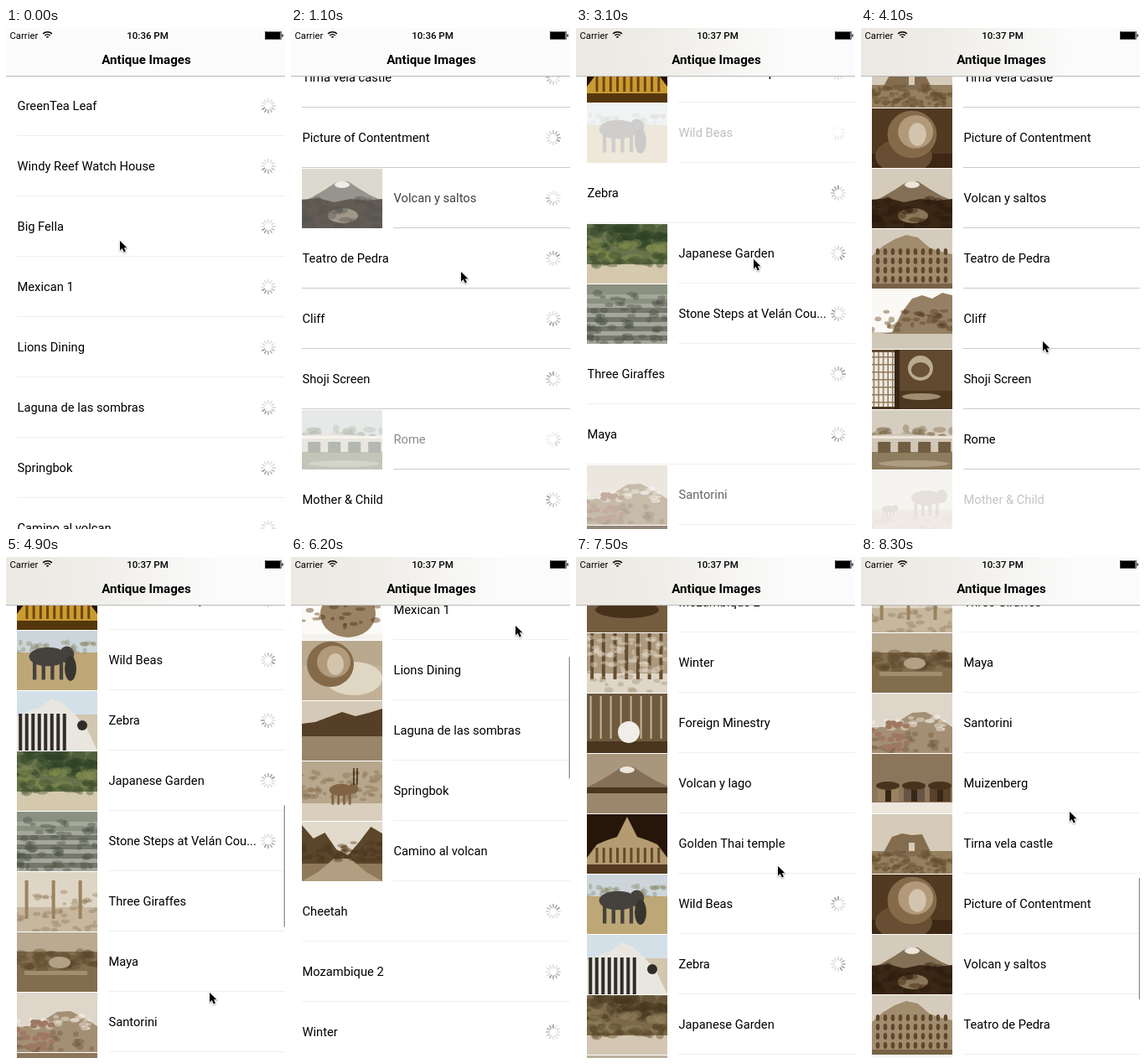
These frames come from a looping animation (333 by 598 pixels, 8400 ms). An HTML page with a canvas:

```html
<!DOCTYPE html>
<html lang="en">
<head>
<meta charset="utf-8">
<title>Photo list</title>
<style>
html, body { margin: 0; width: 100%; height: 100%; overflow: hidden; background: #fff; }
canvas { display: block; width: 333px; height: 598px; }
</style>
</head>
<body>
<canvas id="stage" width="333" height="598"></canvas>
<script>
const LOOP = 8400, W = 333, H = 598, NAV = 57, ROW = 72, PW = 96, PH = 71, FADE = 200;
const ctx = document.getElementById('stage').getContext('2d');
let pen = ctx, seed = 1;
const random = () => (seed = seed * 16807 % 2147483647) / 2147483647;

// Shapes
function rect(color, x, y, w, h) { pen.fillStyle = color; pen.fillRect(x, y, w, h); }
function blob(color, x, y, rx, ry = rx) {
  pen.fillStyle = color;
  pen.beginPath(); pen.ellipse(x, y, rx, ry, 0, 0, 7); pen.fill();
}
// A filled skyline with evenly spaced heights
function ridge(color, base, ...tops) {
  pen.fillStyle = color;
  pen.beginPath();
  pen.moveTo(0, base);
  tops.forEach((y, i) => pen.lineTo(i * PW / (tops.length - 1), y));
  pen.lineTo(PW, base);
  pen.fill();
}
function foliage(color, n, top, bottom, r = 4) {
  pen.globalAlpha = .4;
  while (n--) blob(color, random() * PW, top + random() * (bottom - top), r * (.5 + random()), r * (.4 + random() * .5));
  pen.globalAlpha = 1;
}
function columns(color, n, width, top, bottom, left = 0, right = PW) {
  for (let i = 0; i < n; i++) rect(color, left + (i + .3) * (right - left) / n, top, width, bottom - top);
}
function beast(color, x, y, k) {
  blob(color, x, y, 18 * k, 9 * k);
  blob(color, x + 18 * k, y - 2 * k, 7 * k, 8 * k);
  columns(color, 4, 3.5 * k, y, y + 22 * k, x - 17 * k, x + 17 * k);
}
function lion(x, y, k) {
  blob('#8d693f', x, y, 28 * k, 27 * k);
  blob('#bd9866', x + 4 * k, y - 3 * k, 20 * k, 19 * k);
  blob('#dcc49c', x + 6 * k, y, 10 * k, 13 * k);
}
function volcano() {
  ridge('#77736c', 46, 40, 33, 25, 16, 15, 24, 32, 38);
  blob('#eae6dd', 48, 19, 9, 4);
}

// name, sky, ground, horizon, subject
const photos = [
  ['GreenTea Leaf', '#55713c', '#3f5a2c', 45, () => blob('#a7c168', 48, 36, 30, 12)],
  ['Windy Reef Watch House', '#b7cbdc', '#77855c', 52, () => columns('#eee', 1, 10, 12, 54, 44)],
  ['Big Fella', '#cfd5d0', '#b59c6b', 40, () => beast('#75664f', 43, 32, 1.3)],
  ['Mexican 1', '#fcfaf5', '#f7f2e9', 64, () => { blob('#9c835f', 55, 40, 33, 28); foliage('#3d2a18', 22, 22, 55); }],
  ['Lions Dining', '#b8ab8b', '#c4b28b', 30, () => { blob('#e5d6b8', 62, 45, 34, 20); lion(34, 28, 1); }],
  ['Laguna de las sombras', '#d5cbb8', '#93886f', 40, () => ridge('#4d4132', 42, 27, 25, 19, 13, 18, 14, 9)],
  ['Springbok', '#b5aa87', '#ddd0b7', 50, () => { foliage('#7d724e', 60, 12, 46); beast('#8b6135', 47, 34, .8); columns('#362b1c', 2, 1.5, 8, 28, 60, 68); }],
  ['Camino al volcan', '#e0dbcd', '#8d7b5a', 44, () => { ridge('#544930', 50, 4, 20, 13, 33, 40, 24, 6, 14); ridge('#b5a07b', 71, 71, 60, 44, 44, 60, 71); foliage('#3d3722', 50, 25, 46); }],
  ['Cheetah', '#b8ad83', '#a08d56', 40, () => beast('#cba55e', 45, 37, 1)],
  ['Mozambique 2', '#8c7c62', '#6f5e43', 28, () => blob('#43321f', 48, 44, 38, 10)],
  ['Winter', '#a99c7e', '#dcd7c9', 48, () => { columns('#5d5038', 7, 4, 0, 55); foliage('#e6e0d1', 70, 5, 48); foliage('#9f9376', 15, 50, 71); }],
  ['Foreign Minestry', '#665d49', '#40372a', 57, () => { columns('#c3b99f', 8, 2, 3, 54); blob('#eee', 50, 46, 13); }],
  ['Volcan y lago', '#a39a86', '#918a79', 47, () => { volcano(); rect('#40372a', 0, 40, PW, 7); }],
  ['Golden Thai temple', '#211204', '#54370d', 58, () => { ridge('#c99c31', 60, 52, 36, 31, 27, 3, 27, 31, 36, 52); columns('#71430b', 10, 3, 40, 58, 8, 90); }],
  ['Wild Beas', '#ccd5da', '#bea776', 26, () => { foliage('#8d8968', 30, 14, 26); beast('#45423d', 37, 31, 1.25); blob('#383530', 64, 45, 7, 15); }],
  ['Zebra', '#d4e0e8', '#d1c6ae', 28, () => { ridge('#e9e6df', 71, 30, 24, 20, 9, 14, 27, 42, 71); columns('#302c28', 8, 4, 27, 71, 0, 60); blob('#302c28', 78, 41, 6); }],
  ['Japanese Garden', '#68734b', '#d4c9ad', 48, () => { foliage('#2d4025', 50, 0, 30, 8); foliage('#869150', 25, 22, 42, 7); foliage('#3d4d2b', 25, 36, 50, 6); }],
  ['Stone Steps at Velán Cou...', '#8b9180', '#74786c', 24, () => { for (let y = 12; y < PH; y += 11) rect('#a5a79c', 0, y, PW, 5); foliage('#484d40', 60, 10, 71, 5); }],
  ['Three Giraffes', '#dfd7bf', '#c9b995', 42, () => { columns('#a7824a', 3, 4, 10, 56); foliage('#8d805a', 40, 20, 71); }],
  ['Maya', '#b4ad93', '#79734f', 23, () => { foliage('#4f4c30', 45, 24, 45, 6); blob('#b1a47b', 51, 36, 13, 7); rect('#9c926a', 9, 46, 75, 5); }],
  ['Santorini', '#d9d8cf', '#a08c70', 40, () => { ridge('#a19079', 71, 43, 41, 33, 23, 22, 30, 40); foliage('#fffaf0', 25, 27, 43); foliage('#655d40', 25, 46, 71); for (let i = 0; i < 22; i++) blob('#c9616f', random() * 44, 35 + random() * 33, 4, 3); }],
  ['Muizenberg', '#85776b', '#eee7da', 58, () => ['#9b8550', '#55547a', '#4d4439'].forEach((c, i) => { rect(c, 7 + i * 31, 36, 25, 21); blob('#403329', 19 + i * 31, 38, 14, 5); rect('#2e2923', 16 + i * 31, 43, 7, 14); })],
  ['Tirna vela castle', '#d6cdb6', '#91825a', 44, () => { ridge('#807050', 50, 50, 49, 27, 23, 25, 24, 49, 50, 50); rect('#d6cdb6', 44, 34, 7, 10); foliage('#584b2c', 65, 45, 71); }],
  ['Picture of Contentment', '#4d3a26', '#38291b', 54, () => { blob('#665035', 38, 57, 34, 21); lion(48, 31, 1.05); }],
  ['Volcan y saltos', '#d2cdbf', '#464036', 37, () => { volcano(); ridge('#30291f', 71, 37, 35, 40, 36, 38, 36); blob('#837764', 49, 56, 18, 9); foliage('#211d16', 35, 36, 71, 6); }],
  ['Teatro de Pedra', '#d2cec3', '#716553', 61, () => { ridge('#a28d6b', 65, 32, 20, 12, 7, 10, 22, 27, 30); for (let y = 27; y < 62; y += 11) for (let x = 7; x < 90; x += 9) blob('#594832', x, y, 2.3, 4); }],
  ['Cliff', '#faf9f4', '#ccc9bc', 51, () => { ridge('#94816a', 53, 53, 53, 51, 27, 11, 7, 11, 4, 7); foliage('#493b29', 35, 25, 49); }],
  ['Shoji Screen', '#5b4b35', '#45382a', 49, () => { rect('#eee8da', 0, 3, 28, 65); columns('#8d7d61', 5, 1.5, 3, 68, 0, 28); for (let y = 8; y < 68; y += 9) rect('#8d7d61', 0, y, 28, 1.5); rect('#30261a', 27, 0, 6, PH); blob('#b9ac8e', 58, 22, 15); blob('#625538', 58, 24, 11, 9); blob('#9f8d70', 59, 56, 23, 4); }],
  ['Rome', '#cbd1ce', '#7f8268', 48, () => { foliage('#667057', 25, 22, 33, 6); ridge('#d0c9b8', 50, 30, 28, 30, 34); columns('#5c6454', 4, 15, 38, 51); rect('#eee7d8', 0, 31, PW, 3); blob('#a1a287', 50, 64, 42, 4); }],
  ['Mother & Child', '#dcd2ba', '#c2b086', 47, () => { beast('#8d7d68', 65, 33, 1); beast('#8d7d68', 20, 46, .45); foliage('#a18d63', 20, 55, 71); }]
];

// Each section loads as it scrolls into view; `delay` is the wait before a row turns brown
const sections = [
  { first: 0, at: 5000, delay: () => 200 },
  { first: 8, at: 6450, delay: () => 100 },
  { first: 13, at: 2575, delay: turn => 3000 + turn * 1500 },
  { first: 18, at: 2650, delay: () => 300 },
  { first: 22, at: 920, delay: (turn, n) => 350 + n * 350 }
];

const rows = photos.map((photo, i) => {
  const section = sections.filter(s => s.first <= i).pop();
  const n = i - section.first, turn = i % 4;
  const load = section.at + n * 15 + turn * 230;
  return { name: photo[0], load, brown: load + section.delay(turn, n), ...develop(photo, i) };
});

// Paints a photo once in colour and once in brown tones
function develop([, sky, ground, horizon, subject], i) {
  const make = () => Object.assign(document.createElement('canvas'), { width: PW, height: PH });
  const color = make(), sepia = make();
  pen = color.getContext('2d', { willReadFrequently: true });
  seed = 99 + i * 7;
  rect(sky, 0, 0, PW, PH);
  rect(ground, 0, horizon, PW, PH);
  subject();
  const image = pen.getImageData(0, 0, PW, PH), d = image.data;
  for (let p = 0; p < d.length; p += 4) {
    const light = (d[p] * .3 + d[p + 1] * .59 + d[p + 2] * .11) / 255;
    [.8, 1.05, 1.45].forEach((power, c) => { d[p + c] = d[p + c] * .2 + 204 * light ** power; });
  }
  sepia.getContext('2d').putImageData(image, 0, 0);
  pen = ctx;
  return { color, sepia };
}

// Resting places of list and pointer, each reached by a drag
const moves = [
  { from: 0, to: 0, scroll: 0, x: 136, y: 254 },
  { from: 100, to: 930, scroll: 1618, x: 203, y: 291 },
  { from: 2100, to: 2600, scroll: 976, x: 212, y: 276 },
  { from: 3200, to: 3700, scroll: 1618, x: 217, y: 374 },
  { from: 4600, to: 5300, scroll: 0, x: 283, y: 330 },
  { from: 5900, to: 6645, scroll: 687, x: 241, y: 369 },
  { from: 7560, to: 8260, scroll: 1335, x: 249, y: 304 }
];

function pose(t) {
  const n = Math.max(1, moves.filter(m => m.from <= t).length - 1);
  const a = moves[n - 1], b = moves[n];
  const k = Math.min(1, Math.max(0, (t - b.from) / (b.to - b.from)));
  const mix = key => a[key] + (b[key] - a[key]) * k * k * (3 - 2 * k);
  const drag = Math.sign(a.scroll - b.scroll) * 275 * Math.sin(Math.PI * k);
  return { scroll: Math.round(mix('scroll')), x: mix('x'), y: Math.min(520, Math.max(82, mix('y') + drag)) };
}

function text(str, x, y, size, weight = 400, align = 'left') {
  pen.font = `${weight} ${size}px Roboto, sans-serif`;
  pen.textAlign = align;
  pen.fillStyle = '#000';
  pen.fillText(str, x, y);
}

function spinner(x, y, t, offset) {
  const lead = Math.floor(t * .012 + 8 + offset);
  pen.lineWidth = 1.7;
  pen.lineCap = 'round';
  for (let i = 0; i < 12; i++) {
    const a = i * Math.PI / 6 - Math.PI / 2, age = (lead - i + 12) % 12;
    pen.strokeStyle = `rgba(90,90,90,${Math.max(.2, .62 - age * .07)})`;
    pen.beginPath();
    pen.moveTo(x + 5 * Math.cos(a), y + 5 * Math.sin(a));
    pen.lineTo(x + 8.3 * Math.cos(a), y + 8.3 * Math.sin(a));
    pen.stroke();
  }
}

function drawRow(row, i, y, t, line) {
  const loaded = t >= row.load, brown = t >= row.brown;
  pen.globalAlpha = loaded ? Math.min(1, (t - (brown ? row.brown : row.load)) / FADE) : 1;
  if (loaded) pen.drawImage(brown ? row.sepia : row.color, 13, y + 1);
  text(row.name, loaded ? 122.5 : 13.5, y + 41, 14.7);
  if (!brown) spinner(313, y + 36, t, t > 900 ? i * 5 : 0);
  pen.globalAlpha = 1;
  rect(line, loaded ? 122 : 13, y + 71, W, 1);
}

function drawNav(t, scroll) {
  rect('#fbfbfb', 0, 0, W, NAV);
  const under = rows[Math.floor((scroll - NAV / 2) / ROW)];
  if (under && t > under.load) {
    const tint = pen.createLinearGradient(0, 0, 250, 0);
    tint.addColorStop(0, '#ece8e2');
    tint.addColorStop(.4, '#efede8');
    tint.addColorStop(1, '#fbfbfb');
    rect(tint, 0, 0, W, NAV);
  }
  rect('#b9b9b9', 0, NAV, W, 1);
  text('Antique Images', 167.5, 43, 15.1, 600, 'center');
  text('Carrier', 4.5, 13, 11.3);
  text(t < 2300 ? '10:36 PM' : '10:37 PM', 169, 13, 11.5, 500, 'center');
  pen.strokeStyle = '#000';
  pen.lineWidth = 1.5;
  pen.lineCap = 'butt';
  for (const r of [1.6, 4.6, 7.6]) {
    pen.beginPath(); pen.arc(49.5, 12.3, r, -2.35, -.79); pen.stroke();
  }
  rect('#000', 309.5, 5, 18, 8);
  pen.lineWidth = .6;
  pen.strokeRect(309.3, 4.5, 19.4, 9);
  rect('#000', 329.5, 7.5, 1.3, 3);
}

function drawCursor(x, y) {
  pen.save();
  pen.translate(x, y);
  pen.scale(.95, .95);
  const arrow = new Path2D('M0 0V12L2.8 9.5 5 14.2 7.2 13.2 5.1 8.8 8.8 8.6Z');
  pen.shadowColor = 'rgba(0,0,0,.35)';
  pen.shadowBlur = 2;
  pen.shadowOffsetY = 1;
  pen.strokeStyle = '#fff';
  pen.lineWidth = 1.6;
  pen.stroke(arrow);
  pen.shadowColor = 'transparent';
  pen.fillStyle = '#000';
  pen.fill(arrow);
  pen.restore();
}

function draw(t) {
  const { scroll, x, y } = pose(t);
  rect('#fff', 0, 0, W, H);
  const line = scroll > 1600 ? '#cbcbcb' : '#efefef';
  rows.forEach((row, i) => {
    const top = NAV + i * ROW - scroll;
    if (top > -ROW && top < H) drawRow(row, i, top, t, line);
  });
  if (scroll !== pose(t - 100).scroll) rect('#8c8c8c', W - 1.3, 59.7 + scroll * .2422, 1.3, 145);
  drawNav(t, scroll);
  drawCursor(x, y);
}

const start = performance.now();
function frame() {
  draw((performance.now() - start) % LOOP);
  requestAnimationFrame(frame);
}
frame();
</script>
</body>
</html>
```
